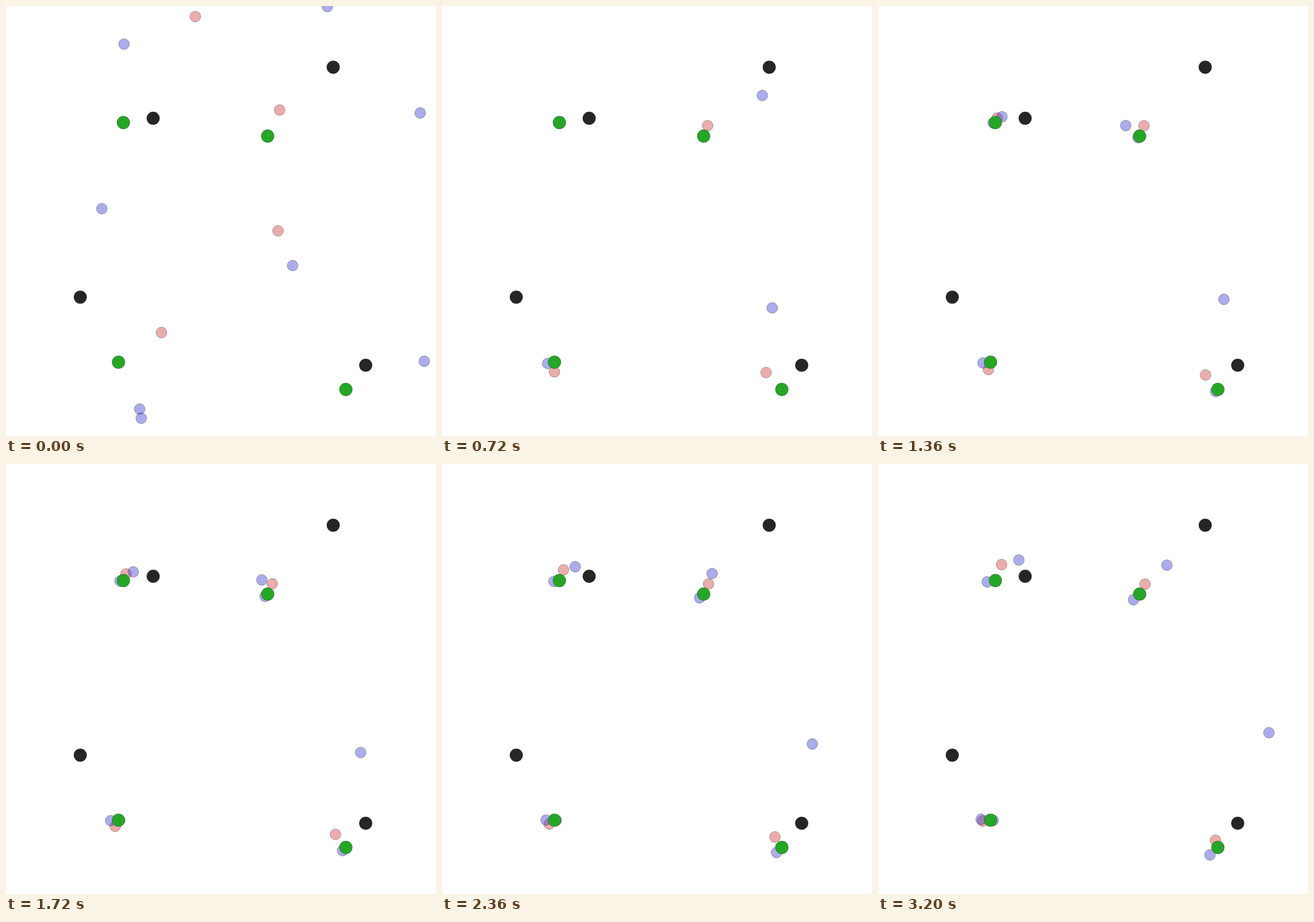
Animation, 748 px wide and 748 px high, one loop 3.24 s. Source, as an HTML page:

```html
<!DOCTYPE html>
<html lang="en">
<head>
<meta charset="utf-8">
<title>Drifting particles</title>
<style>
  html, body { margin: 0; width: 100%; height: 100%; overflow: hidden; background: #fff; }
  svg { display: block; width: 100vw; height: 100vh; }
  circle { stroke: #000; stroke-opacity: .3; stroke-width: 1; }
  .red { fill: #cd2f2f; fill-opacity: .4; }
  .blue { fill: #2f2fcd; fill-opacity: .4; }
  .green { fill: #26a626; }
  .black { fill: #262626; }
</style>
</head>
<body>
<svg id="stage" viewBox="0 0 748 748"></svg>
<script>
const LOOP = 3240, STEP = 40;
const BEND = 400, ARRIVE = 640, LAST = LOOP - STEP;

const point = (x, y) => ({ x, y });
const stage = document.getElementById('stage');
const movers = [];

function place(dot, x, y) {
  dot.setAttribute('cx', x);
  dot.setAttribute('cy', y);
}

function addDot(kind, radius, { x, y }) {
  const dot = document.createElementNS('http://www.w3.org/2000/svg', 'circle');
  dot.setAttribute('class', kind);
  dot.setAttribute('r', radius);
  place(dot, x, y);
  stage.append(dot);
  return dot;
}

// A mover flies in an arc from start through bend to rest, then drifts steadily to end.
function addMover(kind, start, bend, rest, end, arrive = ARRIVE) {
  movers.push({ dot: addDot(kind, 9.4, start), start, bend, rest, end, arrive });
}

const mix = (a, b, u) => a + (b - a) * u;

function coordinate({ start, bend, rest, end, arrive }, axis, t) {
  if (t > arrive) return mix(rest[axis], end[axis], (t - arrive) / (LAST - arrive));
  const first = mix(start[axis], bend[axis], t / BEND);
  const second = mix(bend[axis], rest[axis], (t - BEND) / (arrive - BEND));
  return mix(first, second, t / arrive);
}

const topLeft = point(204.2, 202.8);
const topRight = point(455.2, 226.3);
const lowLeft = point(195.7, 619.6);
const lowRight = point(591.2, 667);

addMover('red', point(329.3, 18.3), point(252, 105), topLeft, point(215, 175));
addMover('red', point(476, 181), point(508, 148), point(462, 208), point(464.5, 209));
addMover('red', point(473.2, 391.2), point(576, 559), point(563, 637), point(587, 654.5));
addMover('red', point(270.4, 568), point(223, 584), point(196, 637), point(182, 621));

addMover('blue', point(559, 1), point(526, 141), topRight, point(444.5, 236));
addMover('blue', point(205.3, 66.3), point(223, 153), topLeft, point(245, 167));
addMover('blue', point(720.5, 186), point(627, 157.5), point(431, 208), point(502.5, 176), 1360);
addMover('blue', point(166.7, 352.6), point(135, 240), topLeft, point(190, 205));
addMover('blue', point(498.6, 451.6), point(563, 525), point(571, 527), point(680, 467.5));
addMover('blue', point(727.6, 618), point(619, 653), lowRight, point(577.5, 680));
addMover('blue', point(232.5, 701.2), point(186.5, 640), lowLeft, point(200.5, 620));
addMover('blue', point(235.3, 717), point(155, 637.5), point(184, 622), point(179.5, 618));

[point(256, 195.3), point(569.2, 106.5), point(129.2, 506.5), point(625.7, 624.9)]
  .forEach(spot => addDot('black', 11.2, spot));
[topLeft, topRight, lowLeft, lowRight]
  .forEach(spot => addDot('green', 11.2, spot));

function render(time) {
  const t = Math.floor((time % LOOP) / STEP) * STEP;
  for (const mover of movers) {
    place(mover.dot, coordinate(mover, 'x', t), coordinate(mover, 'y', t));
  }
}

const origin = performance.now();
function tick() {
  render(performance.now() - origin);
  requestAnimationFrame(tick);
}
tick();
</script>
</body>
</html>
```
